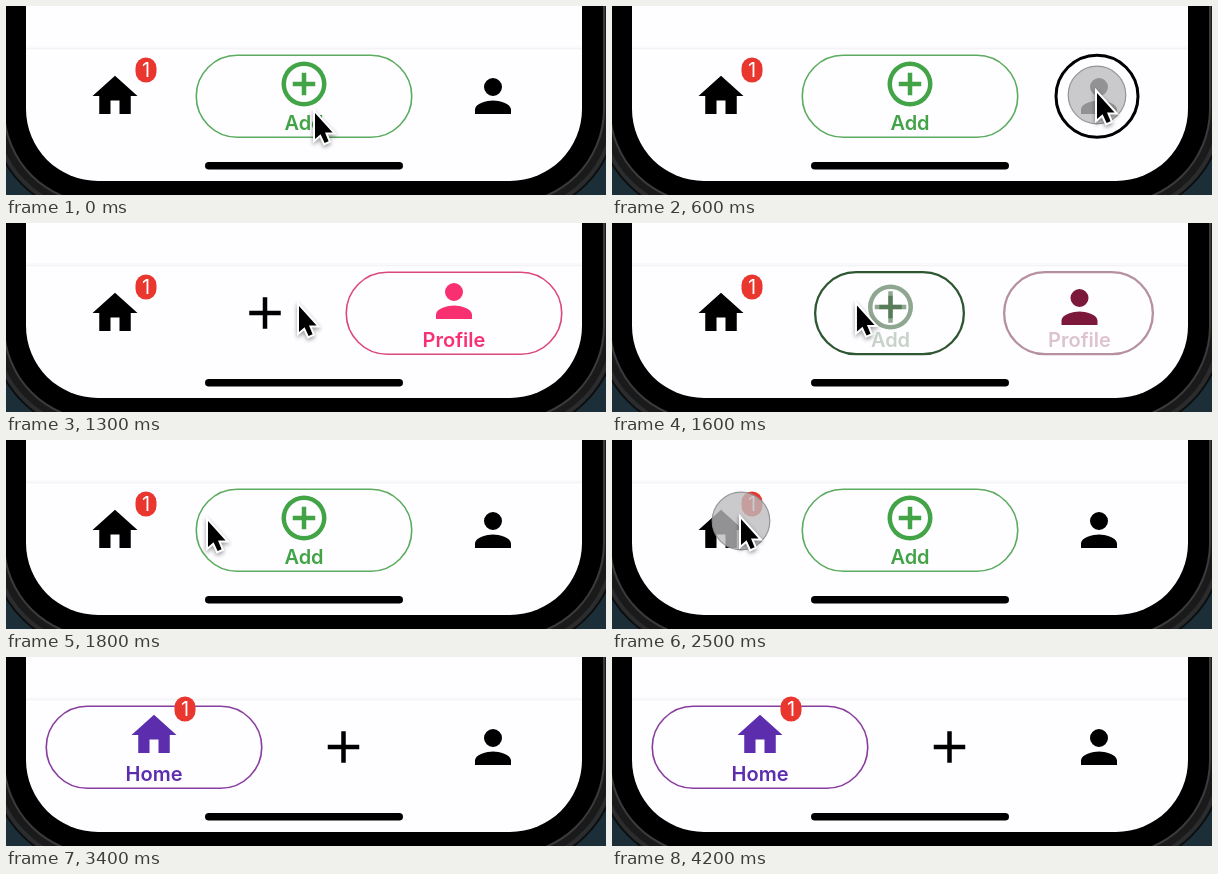
These frames come from a looping animation (600 px wide and 189 px high, 4.3 s). An HTML page with a canvas:

```html
<!DOCTYPE html>
<html lang="en">
<head>
<meta charset="utf-8">
<title>Tab bar</title>
<style>
  html, body { margin: 0; width: 100%; height: 100%; overflow: hidden; background: #000; }
  canvas { display: block; width: 600px; height: 189px; }
</style>
</head>
<body>
<canvas width="600" height="189"></canvas>
<script>
const ctx = document.querySelector('canvas').getContext('2d');
const LOOP = 4300, STEP = 100, MORPH = 400;
const HOME = 0, ADD = 1, PROFILE = 2;

// Icons live on a 24 x 24 grid
const plus = new Path2D('M19 13h-6v6h-2v-6H5v-2h6V5h2v6h6z');
const circledPlus = new Path2D('M13 7h-2v4H7v2h4v4h2v-4h4v-2h-4zM12 2a10 10 0 1 0 0 20 10 10 0 0 0 0-20zm0 18a8 8 0 1 1 0-16 8 8 0 0 1 0 16z');
const house = new Path2D('M10 20v-6h4v6h5v-8h3L12 3 2 12h3v8z');
const person = new Path2D('M12 12a4 4 0 1 0 0-8 4 4 0 0 0 0 8zm0 2c-2.67 0-8 1.34-8 4v2h16v-2c0-2.66-5.33-4-8-4z');
const pointer = new Path2D('M0 0V26L5.6 21.2 9.6 30 13.6 28.2 10 19.5H17.6z');

const tabs = [
  { label: 'Home', rest: house, active: house, color: [92, 45, 172], border: [136, 62, 158] },
  { label: 'Add', rest: plus, active: circledPlus, color: [67, 163, 71], border: [92, 172, 95] },
  { label: 'Profile', rest: person, active: person, color: [248, 48, 114], border: [219, 72, 126] },
];
const taps = [
  { at: 600, from: ADD, to: PROFILE },
  { at: 1400, from: PROFILE, to: ADD },
  { at: 2600, from: ADD, to: HOME },
];
const touches = [[500, 700], [1400, 1500], [2400, 2600]];
// Pointer tip: time, x, y
const route = [
  [0, 309, 107], [500, 485, 87], [700, 485, 87], [1300, 293, 83], [1400, 264, 83],
  [1500, 260, 83], [1800, 202, 81], [2300, 129, 79], [2600, 129, 79], [3300, 160, 200],
];

const clamp = v => Math.max(0, Math.min(1, v));
const smooth = v => v * v * (3 - 2 * v);
const mix = (a, b, k) => a + (b - a) * k;
const tint = (color, k) => `rgb(${color.map(c => Math.round(c * k))})`;

function pointerAt(t) {
  const i = route.findIndex(p => p[0] > t);
  if (i < 0) return route[route.length - 1].slice(1);
  const [t0, x0, y0] = route[i - 1], [t1, x1, y1] = route[i];
  const k = smooth((t - t0) / (t1 - t0));
  return [mix(x0, x1, k), mix(y0, y1, k)];
}

function tabState(t) {
  const tap = taps.filter(p => p.at <= t).pop() || { at: -MORPH, from: ADD, to: ADD };
  const k = smooth(clamp((t - tap.at) / MORPH));
  const on = [0, 0, 0];
  on[tap.from] += 1 - k;
  on[tap.to] += k;
  return { on, selected: tap.to };
}

function box(x, y, w, h, r, fill) {
  ctx.beginPath();
  ctx.roundRect(x, y, w, h, r);
  ctx.fillStyle = fill;
  ctx.fill();
}

function text(str, x, y, font, color) {
  ctx.font = `${font} Inter, sans-serif`;
  ctx.textAlign = 'center';
  ctx.fillStyle = color;
  ctx.fillText(str, x, y);
}

function drawPhone() {
  ctx.fillStyle = '#1c2f38';
  ctx.fillRect(0, 0, 600, 189);
  // Nested rounded outlines share corner centres at (92, 103) and (504, 103)
  const shell = (r, fill) => box(92 - r, -200, 412 + 2 * r, 303 + r, r, fill);
  shell(108, '#0c0d0e');
  shell(106, '#2b2c2e');
  shell(102, '#1a1a1b');
  shell(95, '#3b3b3d');
  shell(93, '#000');
  shell(72, '#fefdff');
  ctx.fillStyle = '#faf9fb';
  ctx.fillRect(20, 40, 556, 4);
  ctx.fillStyle = '#f3f2f5';
  ctx.fillRect(20, 42, 556, 1);
  box(199, 156, 198, 7.5, 3.75, '#000');
}

function drawIcon(path, x, y, color, alpha) {
  ctx.save();
  ctx.globalAlpha = alpha;
  ctx.translate(x - 27, y - 27);
  ctx.scale(2.25, 2.25);
  ctx.fillStyle = color;
  ctx.fill(path, 'evenodd');
  ctx.restore();
}

function drawTab(tab, x, on, selected) {
  const y = 90 - 12 * on, color = tint(tab.color, on);
  if (selected || on > 0) {
    const w = mix(82, 215.5, on), left = x - mix(2, 0, on) - w / 2;
    ctx.globalAlpha = selected ? 1 : on;
    ctx.beginPath();
    ctx.roundRect(left, 49.2, w, 82, 41);
    ctx.strokeStyle = tint(tab.border, on);
    ctx.lineWidth = mix(3, 1.6, on);
    ctx.stroke();
  }
  if (tab.rest === tab.active) {
    drawIcon(tab.rest, x, y, color, 1);
  } else {
    drawIcon(tab.rest, x, y, color, 1 - on);
    drawIcon(tab.active, x, y, color, on);
  }
  ctx.globalAlpha = on * on;
  text(tab.label, x, 124, '600 20px', color);
  ctx.globalAlpha = 1;
  if (tab.label === 'Home') {
    box(x + 20.5, y - 38.5, 21, 25, 10.5, '#e9362f');
    text('1', x + 31, y - 19, '400 20px', '#fff');
  }
}

function drawPointer(t) {
  const [x, y] = pointerAt(t);
  if (touches.some(([a, b]) => t >= a && t < b)) {
    ctx.beginPath();
    ctx.arc(x, y + 2, 28.8, 0, 7);
    ctx.fillStyle = 'rgba(188,188,190,.78)';
    ctx.fill();
    ctx.strokeStyle = 'rgba(140,140,142,.9)';
    ctx.lineWidth = 1.2;
    ctx.stroke();
  }
  ctx.save();
  ctx.translate(x, y);
  ctx.shadowColor = 'rgba(0,0,0,.4)';
  ctx.shadowBlur = 4;
  ctx.shadowOffsetY = 2;
  ctx.strokeStyle = '#fff';
  ctx.lineWidth = 4;
  ctx.stroke(pointer);
  ctx.shadowColor = 'transparent';
  ctx.fillStyle = '#000';
  ctx.fill(pointer);
  ctx.restore();
}

function draw(now) {
  const t = Math.floor((now % LOOP) / STEP) * STEP;
  const { on, selected } = tabState(t);
  const centers = [109 + 39 * on[HOME], 259 + 39 * on[ADD] + 78.5 * on[HOME], 487 - 39 * on[PROFILE]];
  drawPhone();
  tabs.forEach((tab, i) => drawTab(tab, centers[i], on[i], i === selected));
  drawPointer(t);
}

let start;
function tick(now) {
  start ??= now;
  draw(now - start);
  requestAnimationFrame(tick);
}
requestAnimationFrame(tick);
</script>
</body>
</html>
```
